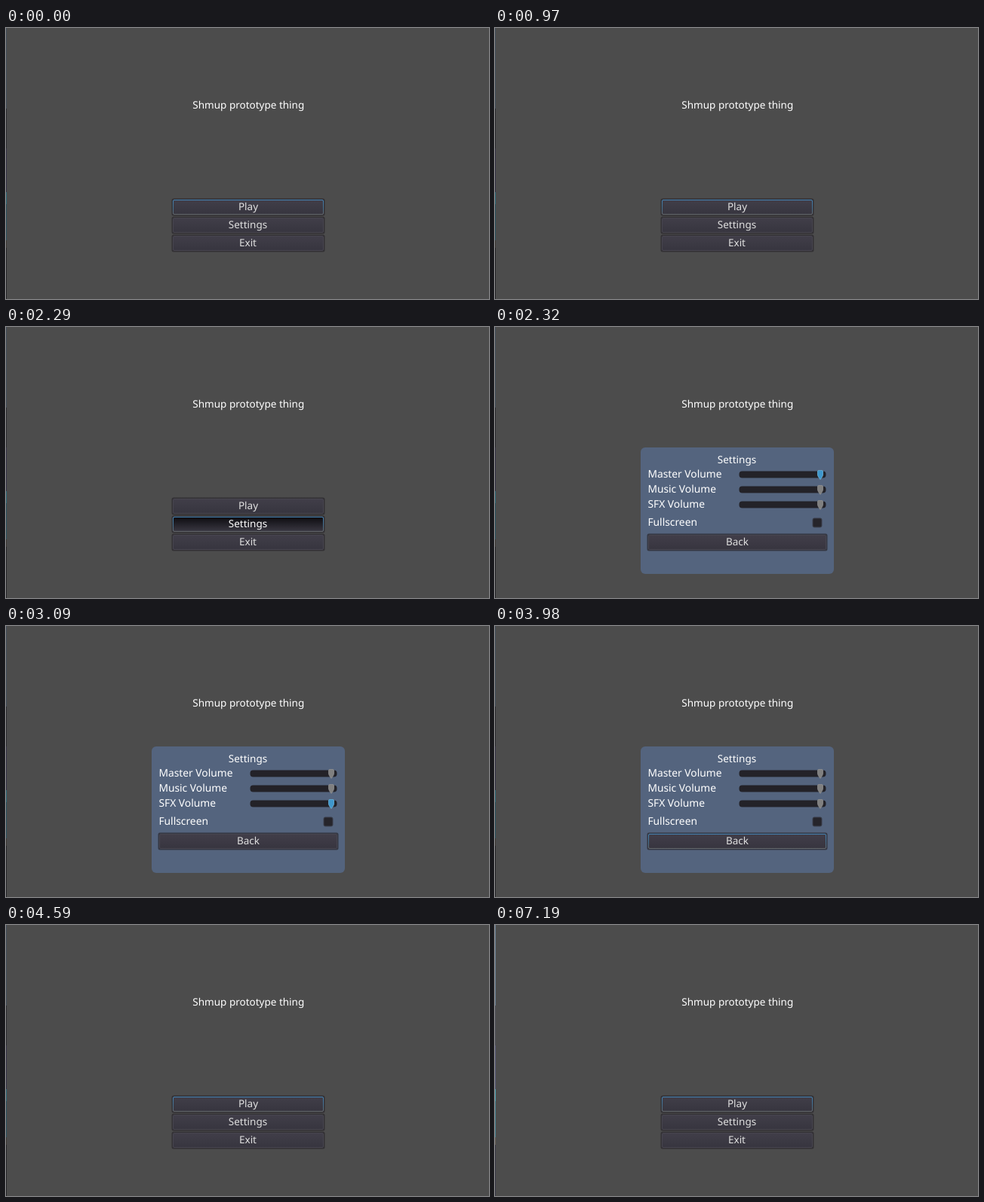
These frames come from a looping animation (640 by 360 pixels, 7.24 s). An HTML page:

```html
<!DOCTYPE html>
<html lang="en">
<head>
<meta charset="utf-8">
<title>Game menu</title>
<style>
html, body { margin: 0; width: 100%; height: 100%; overflow: hidden; background: #4c4c4c; }
svg { display: block; width: 640px; height: 360px; }
text { font: 13.5px "Noto Sans", "Open Sans", sans-serif; fill: #fff; text-rendering: geometricPrecision; }
.mid { text-anchor: middle; }
.row { font-size: 13.8px; }

.btn { --face: url(#up); --ink: #e0e0e0; }
.btn text { fill: var(--ink); text-anchor: middle; }
.rim { fill: #28262c; fill-opacity: .7; }
.face { fill: var(--face); stroke: #47454f; }
.ring { fill: none; stroke: url(#glow); }

.anim { animation: 7.24s step-end infinite; }
#cursor { animation-name: cursor; }
#open { animation-name: open; }
#panel { animation-name: panel; opacity: 0; }
#knob { animation-name: knob; }
#boxRing { animation-name: box; opacity: 0; }
#backRing { animation-name: back; opacity: 0; }
#close { animation-name: close; }
#flash { animation-name: flash; opacity: 0; }

@keyframes cursor {
  0%, 13.397%, 32.044%, 100% { transform: translateY(0); }
  6.629%, 18.232%, 26.933% { transform: translateY(24px); }
  10.497%, 22.099% { transform: translateY(48px); }
}
@keyframes open {
  0%, 32.044%, 100% { --face: url(#up); --ink: #e0e0e0; }
  31.629% { --face: url(#down); --ink: #fff; }
}
@keyframes panel {
  0%, 63.397%, 100% { opacity: 0; }
  32.044% { opacity: 1; }
}
@keyframes knob {
  0%, 100% { transform: translateY(0); opacity: 1; }
  39.640% { transform: translateY(20px); opacity: 1; }
  42.679% { transform: translateY(40px); opacity: 1; }
  49.171% { transform: translateY(40px); opacity: 0; }
}
@keyframes box {
  0%, 54.972%, 100% { opacity: 0; }
  49.171% { opacity: 1; }
}
@keyframes back {
  0%, 63.397%, 100% { opacity: 0; }
  54.972% { opacity: 1; }
}
@keyframes close {
  0%, 63.397%, 100% { --face: url(#up); --ink: #e0e0e0; }
  62.154% { --face: url(#down); --ink: #fff; }
}
@keyframes flash {
  0%, 100% { opacity: 0; }
  99.309% { opacity: 1; }
}
</style>
</head>
<body>
<svg viewBox="0 0 640 360">
  <defs>
    <linearGradient id="up" x2="0" y2="1">
      <stop stop-color="#413e49"/><stop offset="1" stop-color="#37353f"/>
    </linearGradient>
    <linearGradient id="down" x2="0" y2="1">
      <stop stop-color="#0d0c10"/><stop offset="1" stop-color="#3a3842"/>
    </linearGradient>
    <linearGradient id="glow" x2="0" y2="1">
      <stop stop-color="#4482b2"/><stop offset=".6" stop-color="#47718f"/><stop offset="1" stop-color="#64686c"/>
    </linearGradient>
    <path id="grab" d="M427.5 192Q427.5 190.5 429 190.5H433Q434.5 190.5 434.5 192V196.5Q434 199 431 202.5Q428 199 427.5 196.5Z"/>
    <g id="slider">
      <rect x="323.5" y="191.5" width="115" height="9" rx="4" fill="#232228"/>
      <use href="#grab" fill="#808080" stroke="#949494" stroke-width=".7"/>
    </g>
  </defs>

  <rect width="640" height="360" fill="#4c4c4c"/>

  <!-- sliver of window at the left edge -->
  <g shape-rendering="crispEdges">
    <rect width="1" height="107" fill="#424d5a"/>
    <rect y="107" width="1" height="53" fill="#2b2b30"/>
    <rect y="160" width="1" height="58" fill="#343246"/>
    <rect y="218" width="1" height="16" fill="#2e6a7a"/>
    <rect y="234" width="1" height="48" fill="#2a505d"/>
    <rect y="282" width="1" height="10" fill="#3c3834"/>
    <rect y="292" width="1" height="68" fill="#242429"/>
  </g>
  <g id="flash" class="anim" shape-rendering="crispEdges">
    <rect width="1" height="107" fill="#6a8096"/>
    <rect y="107" width="1" height="53" fill="#50515a"/>
    <rect y="160" width="1" height="58" fill="#5b5c7c"/>
    <rect y="218" width="1" height="16" fill="#4fa2b4"/>
    <rect y="234" width="1" height="48" fill="#4a8494"/>
    <rect y="282" width="1" height="10" fill="#686058"/>
    <rect y="292" width="1" height="68" fill="#3a3a48"/>
  </g>

  <text class="mid" x="321.3" y="107">Shmup prototype thing</text>

  <g class="btn">
    <rect class="rim" x="219.5" y="226.5" width="203" height="23" rx="2.5"/>
    <rect class="face" x="221.5" y="228.5" width="199" height="19" rx="1.5"/>
    <text x="321" y="242">Play</text>
  </g>
  <g id="open" class="btn anim">
    <rect class="rim" x="219.5" y="250.5" width="203" height="23" rx="2.5"/>
    <rect class="face" x="221.5" y="252.5" width="199" height="19" rx="1.5"/>
    <text x="320.5" y="266">Settings</text>
  </g>
  <g class="btn">
    <rect class="rim" x="219.5" y="274.5" width="203" height="23" rx="2.5"/>
    <rect class="face" x="221.5" y="276.5" width="199" height="19" rx="1.5"/>
    <text x="320.5" y="290">Exit</text>
  </g>
  <rect id="cursor" class="ring anim" x="221.5" y="228.5" width="199" height="19" rx="1.5"/>

  <g id="panel" class="anim">
    <rect x="193" y="160" width="256" height="168" rx="6" fill="#54647e"/>
    <text class="mid" x="320.5" y="181">Settings</text>
    <text class="row" x="202.4" y="200">Master Volume</text>
    <text class="row" x="202.4" y="220">Music Volume</text>
    <text class="row" x="202.4" y="240">SFX Volume</text>
    <text class="row" x="202.4" y="264">Fullscreen</text>
    <use href="#slider"/>
    <use href="#slider" y="20"/>
    <use href="#slider" y="40"/>
    <g id="knob" class="anim">
      <use href="#grab" fill="#3f97cc" stroke="#5fabd6" stroke-width=".7"/>
    </g>
    <rect x="421" y="254" width="12" height="12" rx="2" fill="#26252b" stroke="#3c414e"/>
    <rect id="boxRing" class="ring anim" x="414.5" y="247.5" width="25" height="25" rx="1.5"/>
    <g id="close" class="btn anim">
      <rect class="rim" x="201.5" y="274.5" width="239" height="23" rx="2.5"/>
      <rect class="face" x="203.5" y="276.5" width="235" height="19" rx="1.5"/>
      <text x="321" y="290">Back</text>
    </g>
    <rect id="backRing" class="ring anim" x="203.5" y="276.5" width="235" height="19" rx="1.5"/>
  </g>
</svg>
</body>
</html>
```
